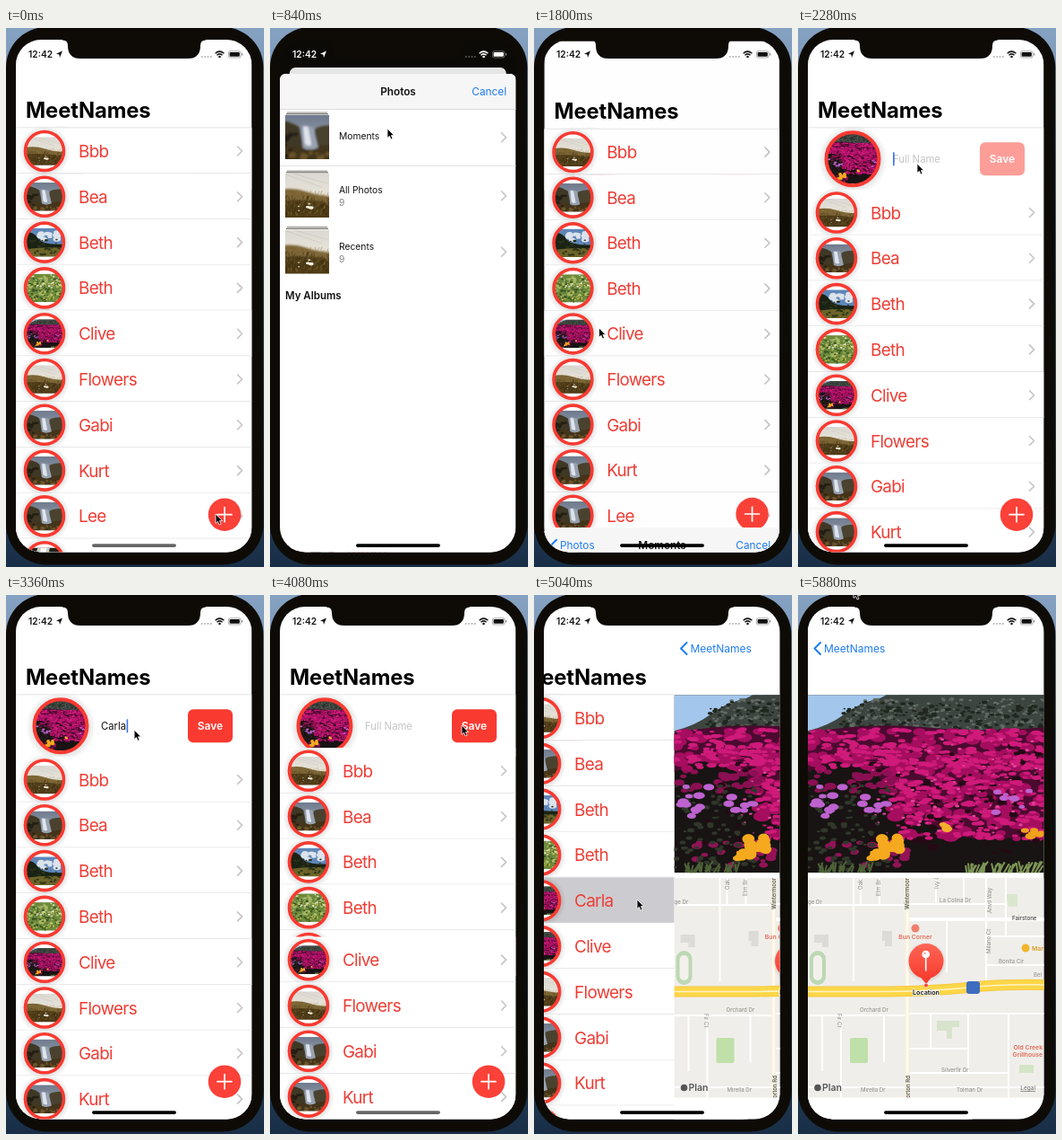
Animation, 288 px wide and 600 px high, one loop 6000 ms. Source, as an HTML page:

```html
<!DOCTYPE html>
<html lang="en">
<head>
<meta charset="utf-8">
<title>Contact list demo</title>
<style>
html, body { margin: 0; width: 100%; height: 100%; overflow: hidden; background: #0e0b06; }
svg { font-family: Inter, Roboto, sans-serif; }
#stage { display: block; width: 288px; height: 600px; }
</style>
</head>
<body>
<svg id="stage" viewBox="0 0 288 600"></svg>
<script>
const LOOP = 6000, STEP = 120, ROW = 50.8, FORM = 68.5, TOP = 111.3;
const RED = '#f93a31', BLUE = '#1f7df0', GREY = '#c5c5c9';
const stage = document.getElementById('stage');
const $ = id => document.getElementById(id);

let seed = 77;
const rnd = () => (seed = seed * 16807 % 2147483647) / 2147483647;

// --- drawing helpers
const rect = (x, y, w, h, fill, more = '') =>
  `<rect x="${x}" y="${y}" width="${w}" height="${h}" fill="${fill}" ${more}/>`;
const circle = (x, y, r, fill, more = '') =>
  `<circle cx="${x}" cy="${y}" r="${r}" fill="${fill}" ${more}/>`;
const shape = (d, fill, more = '') => `<path d="${d}" fill="${fill}" ${more}/>`;
const line = (d, color, w, more = '') =>
  `<path d="${d}" fill="none" stroke="${color}" stroke-width="${w}" ${more}/>`;
const text = (x, y, size, str, fill = '#111', more = '') =>
  `<text x="${x}" y="${y}" font-size="${size}" fill="${fill}" ${more}>${str}</text>`;
const group = (id, body, more = '') => `<g id="${id}" ${more}>${body}</g>`;
const soft = body => `<g filter="url(#blur)">${body}</g>`;
const MID = 'text-anchor="middle"', SEMI = 'font-weight="600"', BOLD = 'font-weight="700"';
const ROUND = 'stroke-linecap="round" stroke-linejoin="round"';

const chevron = y => line(`M258.5 ${y - 5}l5 5l-5 5`, '#c4c4c8', 1.6, ROUND);
const back = y => line(`M25 ${y - 6.5}l-6.5 6.5l6.5 6.5`, BLUE, 2, ROUND);
const photo = (kind, x, y, w, h, fit = 'slice') =>
  `<svg x="${x}" y="${y}" width="${w}" height="${h}" viewBox="0 0 264 198" preserveAspectRatio="xMidYMid ${fit}"><use href="#${kind}"/></svg>`;

function dots(n, fill, x, y, w, h, r0, r1, flat = 0.6) {
  let d = '';
  for (let i = 0; i < n; i++) {
    const r = +(r0 + rnd() * (r1 - r0)).toFixed(1), k = r * flat;
    d += `M${(x + rnd() * w - r).toFixed(1)} ${(y + rnd() * h).toFixed(1)}` +
      `a${r} ${k} 0 1 0 ${2 * r} 0a${r} ${k} 0 1 0 ${-2 * r} 0`;
  }
  return shape(d, fill);
}

function blades(n, color, x, y, w, h, len) {
  let d = '';
  for (let i = 0; i < n; i++)
    d += `M${(x + rnd() * w).toFixed(1)} ${(y + rnd() * h).toFixed(1)}l${(rnd() * 14 - 4).toFixed(1)} ${-len}`;
  return line(d, color, 2);
}

// --- pictures, all 264 x 198
const pictures = {
  dune: () => rect(0, 0, 264, 198, 'url(#haze)') +
    line('M20 0L200 62M70 0L240 50', '#b9b4a6', 1.5) +
    soft(shape('M-20 78Q60 58 130 82T290 104V220H-20Z', '#7b6434') +
      shape('M-20 124Q120 108 290 138V220H-20Z', '#4f3c18')) +
    blades(100, '#8d7542', 0, 92, 264, 100, 15) + blades(130, '#3a2b10', 0, 112, 264, 86, 15) +
    dots(4, '#cfc2a0', 90, 130, 120, 40, 4, 7) + dots(2, '#f6f0e0', 135, 148, 22, 8, 9, 12),
  fall: () => rect(0, 0, 264, 198, 'url(#dusk)') +
    soft(shape('M-20 22Q50 22 96 54L118 160L-20 175Z', '#3f3825') +
      shape('M290 48Q200 40 168 62L150 160L290 175Z', '#4a422f') +
      shape('M-20 130Q120 158 290 122V220H-20Z', '#43341a') +
      shape('M108 48Q132 42 160 56L182 146Q140 164 112 146Z', '#98a2b0') +
      shape('M114 54Q124 48 136 54L152 134Q134 142 122 130Z', '#dfe4ec') +
      dots(16, '#241e12', 0, 80, 80, 110, 8, 18) + dots(12, '#6c552a', 60, 165, 190, 30, 8, 18)),
  stream: () => rect(0, 0, 264, 198, '#25221a') +
    soft(dots(24, '#403a29', 0, 0, 264, 198, 8, 18) +
      shape('M85 0H170Q150 55 205 100T240 200H190Q180 130 135 95Q95 105 75 200H40Q50 90 85 0Z', '#c9c9c6') +
      shape('M105 0H150Q130 50 165 85L140 80Q110 60 100 90Z', '#fafafa')),
  coast: () => rect(0, 0, 264, 198, '#5f86b8') +
    soft(dots(14, '#dbe3ec', 90, 30, 174, 50, 16, 30) +
      shape('M-20 25Q55 20 85 70T290 112V220H-20Z', '#1a2213') +
      shape('M-20 150Q130 128 290 138V220H-20Z', '#6c6428') + dots(40, '#2b331a', 0, 80, 240, 110, 5, 13)),
  garden: () => rect(0, 0, 264, 198, '#6d8a3c') + dots(70, '#a6b765', 0, 10, 264, 180, 7, 15) +
    dots(90, '#3b5822', 0, 30, 264, 168, 4, 12) + dots(35, '#d9c649', 0, 60, 264, 120, 4, 8) +
    dots(30, '#e9e9d4', 0, 0, 264, 100, 4, 9),
  bloom: () => rect(0, 0, 264, 198, '#181413') + rect(0, 0, 100, 44, '#a3c6ec') +
    shape('M0 40Q24 34 40 22T72 6Q84 4 92 -4H264V60H0Z', '#3d4540') +
    dots(260, '#616c64', 44, 4, 220, 36, 1, 2.6) + dots(200, '#20271f', 36, 8, 228, 34, 1, 3.5) +
    shape('M0 42Q70 30 130 36T264 36V150Q200 172 150 150T80 92T0 86Z', '#4b0a2f') +
    dots(110, '#a50d5f', 0, 40, 264, 44, 4, 9) + dots(150, '#a50d5f', 90, 68, 174, 92, 4, 10) +
    dots(26, '#8b0f52', 0, 84, 100, 24, 3, 7) + dots(24, '#931257', 20, 160, 90, 30, 3, 6) +
    dots(120, '#250915', 30, 56, 234, 120, 2, 5) +
    dots(210, '#cf1a7a', 0, 38, 264, 44, 2, 6, 0.45) + dots(260, '#cf1a7a', 92, 68, 172, 92, 2, 6, 0.45) +
    dots(70, '#e2449a', 60, 44, 204, 110, 1, 2.5) + dots(110, '#30372b', 0, 100, 92, 96, 1.5, 4) +
    dots(20, '#bd62cf', 6, 98, 92, 38, 4, 6.5) + dots(8, '#bd62cf', 205, 106, 45, 26, 3, 6) +
    dots(14, '#f4a91e', 82, 158, 20, 24, 5, 8, 0.8) + dots(5, '#f4a91e', 66, 174, 14, 8, 4, 6) +
    dots(4, '#f4b02c', 150, 144, 9, 6, 4, 6) + dots(7, '#f0a11c', 242, 150, 20, 10, 4, 6) +
    blades(40, '#7d9556', 175, 198, 80, 6, 13) + blades(26, '#4d6137', 0, 196, 70, 6, 11)
};

const stops = (id, a, b) => `<linearGradient id="${id}" x2="0" y2="1"><stop stop-color="${a}"/><stop offset="1" stop-color="${b}"/></linearGradient>`;
const defs = '<defs>' + stops('haze', '#dbd9d3', '#f3ecdc') + stops('dusk', '#6f7b8e', '#a5acb6') +
  stops('desk', '#86a2c2', '#182e47') + stops('pinRed', '#ff6656', '#f73d30') +
  `<filter id="blur"><feGaussianBlur stdDeviation="4"/></filter>
  <radialGradient id="shade"><stop offset=".74" stop-opacity=".13"/><stop offset="1" stop-opacity="0"/></radialGradient>
  <clipPath id="screen">${rect(11, 13, 263.4, 570.5, '#000', 'rx="28"')}</clipPath>
  <clipPath id="disc">${circle(43, 25.7, 21, '#000')}</clipPath>
  <clipPath id="bigDisc">${circle(61, 34.5, 29, '#000')}</clipPath>
  <clipPath id="mapBox">${rect(11, 315, 264, 244.5, '#000')}</clipPath>` +
  Object.entries(pictures).map(([id, draw]) => group(id, draw())).join('') + '</defs>';

// --- contact list
const people = [
  ['Bbb', 'dune'], ['Bea', 'fall'], ['Beth', 'coast'], ['Beth', 'garden'], ['Carla', 'bloom'],
  ['Clive', 'bloom'], ['Flowers', 'dune'], ['Gabi', 'fall'], ['Kurt', 'fall'], ['Lee', 'fall'], ['Mmm', 'stream']
];
const ADDED = 4, TYPED = people[ADDED][0];

const row = ([name, kind], i) => group('row' + i,
  rect(11, 0, 263.5, ROW, '#fff', `id="bg${i}"`) +
  circle(43, 26.2, 29, 'url(#shade)') + circle(43, 25.7, 22, '#fff') +
  `<g clip-path="url(#disc)">${photo(kind, 22, 9.9, 42, 31.6, 'meet')}</g>` +
  circle(43, 25.7, 21.5, 'none', `stroke="${RED}" stroke-width="3.6"`) +
  text(81, 32.8, 18.9, name, '#ee3d35', 'letter-spacing="-.72"') + chevron(25.7) +
  rect(11, ROW - 0.8, 263.5, 0.8, '#dedee1'));

const form = `<g transform="translate(0 ${TOP})">` + rect(11, 0, 263.5, FORM, '#fff') +
  circle(61, 35.5, 39, 'url(#shade)') + circle(61, 34.5, 30, '#fff') +
  `<g clip-path="url(#bigDisc)">${photo('bloom', 31, 6, 60, 56)}</g>` +
  circle(61, 34.5, 29.5, 'none', `stroke="${RED}" stroke-width="4"`) +
  text(106, 38.5, 11.3, '', GREY, 'id="field"') +
  rect(106, 27, 1.6, 15, '#3b74e6', 'id="caret"') +
  rect(203, 16, 50, 37, RED, 'rx="6" id="save"') +
  text(228, 38.7, 12, 'Save', '#fff', `${MID} ${SEMI}`) + '</g>';

const list = group('list', rect(11, 13, 263.5, 571, '#fff', 'rx="7" id="page"') + form +
  people.map(row).join('') + rect(11, TOP - 0.8, 263.5, 0.8, '#dedee1') +
  text(22, 100, 23.8, 'MeetNames', '#000', `${BOLD} letter-spacing="-.1"`) +
  circle(244, 541.7, 18.3, '#fb4138') +
  line('M236 541.7h16M244 533.7v16', '#fff', 1.7, 'stroke-linecap="round"'));

// --- photo picker sheet
const album = (y, kind, name, count) =>
  rect(19, y - 3.4, 45, 1, '#8d8a83') + rect(18, y - 1.7, 47, 1, '#55514a') + photo(kind, 17, y, 49, 49) +
  text(77, count ? y + 22 : y + 27, 10.3, name) +
  (count ? text(77, y + 36, 10.3, count, '#8a8a8e') : '') + chevron(y + 24.7);

const sections = [
  ['August 9, 2012', 'stream'], ['August 9, 2012', 'fall'], ['March 30, 2018', 'bloom'],
  ['November 27', 'bloom'], ['November 29', 'fall', 'dune']
];
const moments = sections.map(([date, ...kinds], i) => {
  const y = 94.3 + i * 99.4;
  return kinds.map((k, j) => photo(k, 11 + j * 66.5, y, 65, 64.5)).join('') +
    (i ? text(22.5, y - 10, 11.5, date, '#111', SEMI) : '');
}).join('') + rect(11, 90, 264, 29, '#f3f3f4') + text(22.5, 109, 11.5, sections[0][0], '#111', SEMI);

const sheet = group('sheet', rect(11, 51, 263.5, 560, '#fff', 'rx="7"') +
  group('albums', album(97, 'fall', 'Moments') + rect(11, 153, 264, 0.8, '#dedee1') +
    album(162, 'dune', 'All Photos', 9) + album(224.5, 'dune', 'Recents', 9) +
    text(17, 302, 11.5, 'My Albums', '#111', SEMI)) +
  group('moments', rect(11, 90, 264, 500, '#fff') + moments) +
  shape('M11 91V58q0-7 7-7H267.5q7 0 7 7V91Z', '#f6f6f7') + rect(11, 90, 264, 0.8, '#d8d8db') +
  group('navA', text(143, 75, 11.8, 'Photos', '#111', `${MID} ${SEMI}`)) +
  group('navB', back(71) + text(29, 75, 11.8, 'Photos', BLUE) + text(143, 75, 11.8, 'Moments', '#111', `${MID} ${SEMI}`)) +
  text(264, 75, 11.8, 'Cancel', BLUE, 'text-anchor="end"'));

// --- detail page
const street = (x, y, str, turn = 0, more = '') =>
  text(0, 0, 6.1, str, '#8c8a87', `transform="translate(${x} ${y}) rotate(${turn})" ${more}`);
const strong = 'style="fill:#55534f" font-weight="600"';
const highway = 'M11 441.5H100Q150 441 190 437T275 434';
const town = `<g clip-path="url(#mapBox)">` + rect(11, 315, 264, 245, '#f0eeea') +
  rect(13, 396, 18, 38, '#bcd8b4', 'rx="9"') + rect(17, 401, 10, 28, '#f2f1ec', 'rx="5"') +
  rect(58, 493, 20, 28, '#bfe0a8', 'rx="2"') + shape('M155 474h25v7h-8v13h-6v-9h-11z', '#d7e3cb') +
  shape('M231 333h14v14h-10z', '#d9e8cd') + rect(247, 523, 16, 9, '#d3e5c6') +
  shape('M18 378h16v14h-7v-5h-9zM94 374h11v17h-8v-6h-3z', '#dddbd8') +
  line('M11 345H122M70 315V345M91 315V345M122 344H232M154 315V344M185 315V344M210 315V430M232 315V380' +
    'M210 380H275M210 412H275M166 362V420M11 468H122M48 468V560M96 468V520M11 548H275M27 468V530M122 466H275' +
    'M148 466V505M122 532H235M190 466V532M235 466V560M122 505H190M62 315V430', '#fff', 2) +
  line('M122 361H275', '#fff', 4) + line('M122 315V560', '#f8efd2', 5) + line('M122 315V560', '#fffaf0', 3) +
  line(highway, '#f3c63f', 12) + line(highway, '#fdd648', 10.6) + line(highway, '#fff3c4', 1.6) +
  street(72, 328, 'Oak Ct', -90) + street(92, 335, 'Elm Br', -90) + street(157, 327, 'Ivy Ct', -90) +
  street(124, 350, 'Wintermoor', -90, strong) + street(158, 342, 'La Colina Dr') +
  street(216, 354, 'Anvil Way', -90) + street(239, 362, 'Fairstone', 0, strong) +
  street(215, 399, 'Milano Ct', -90) + street(224, 410, 'Bonita Cir') + street(263, 425, 'Bel') +
  street(69, 464, 'Orchard Dr') + street(44, 466, 'Fir Ct', 90) + street(160, 531, 'Silverfir Dr') +
  street(70, 553, 'Mirella Dr') + street(177, 553, 'Tolman Dr') + street(125, 560, 'orton Rd', -90, strong) +
  street(11, 344, 'ge Dr') + circle(131, 371, 4.5, '#f07f6d') + circle(254, 393, 4.5, '#f1b52c') +
  text(131, 383, 6.8, 'Bun Corner', '#e06b58', `${MID} ${SEMI}`) + text(261, 395.5, 6.8, 'Mart', '#d99a1e', SEMI) +
  text(273, 506, 6.8, 'Old Creek', '#e06b58', `text-anchor="end" ${SEMI}`) +
  text(273, 514, 6.8, 'Grillhouse', '#e06b58', `text-anchor="end" ${SEMI}`) +
  rect(188, 430, 15, 14, '#3e6cc0', 'rx="3"') +
  circle(143, 409, 23, 'url(#shade)') + shape('M135 423L143 433L151 423Z', '#f73d30') +
  circle(143, 407.5, 19.5, 'url(#pinRed)') + circle(142.7, 400, 4.3, '#fff') + circle(141.5, 399, 1.2, '#f99') +
  line('M142.7 403V418', '#fff', 1.6, 'stroke-linecap="round"') + circle(143, 434.5, 2.3, '#f84337', 'stroke="#fff" stroke-width=".5"') +
  text(143, 445, 7.2, 'Location', '#111', `${MID} ${SEMI} stroke="#fff" stroke-width="1.6" paint-order="stroke"`) +
  circle(22, 548.5, 3.8, '#555') + text(27, 552, 10.5, 'Plan', '#555', SEMI) +
  text(265, 551, 6.5, 'Legal', '#666', 'text-anchor="end" text-decoration="underline"') + '</g>';

const detail = group('detail', rect(11, 13, 264, 571, '#fff') + back(59.5) +
  text(29, 64, 12, 'MeetNames', BLUE) + photo('bloom', 11, 111.3, 264, 198) + town);

// --- phone
const status = group('status', text(25, 33, 10.2, '12:42', 'currentColor', SEMI) +
  shape('M63 25.5L56 28.7L59.4 29.4L60 33Z', 'currentColor') +
  [218, 221.4, 224.8, 228.2].map(x => circle(x + 0.7, 32, 0.9, 'currentColor', 'opacity=".35"')).join('') +
  line('M233.6 28.2q4.9-4.2 9.8 0M235.4 30.2q3.1-2.6 6.2 0', 'currentColor', 1.5) +
  circle(238.5, 32, 1.3, 'currentColor') +
  rect(248.4, 25.8, 13.6, 7.2, 'none', 'rx="2" stroke="currentColor" stroke-width=".7" opacity=".5"') +
  rect(249.6, 27, 11.2, 4.8, 'currentColor', 'rx="1"') + rect(263, 28, 1, 2.6, 'currentColor', 'opacity=".5"'));

const notch = shape('M63 12H223V13.4q-6 0-6 6q0 14.6-14 14.6H83q-14 0-14-14.6q0-6-6-6Z', '#0e0b06');
const pointer = group('pointer',
  shape('M0 0V10.4L2.4 8.3L4.1 12L6 11.2L4.4 7.6H7.6Z', '#000', 'stroke="#fff" stroke-width=".8"'));

stage.innerHTML = defs + rect(0, 0, 288, 600, 'url(#desk)') +
  rect(0, -1, 287.3, 598.5, '#0e0b06', 'rx="45"') +
  `<g clip-path="url(#screen)">${rect(11, 13, 264, 571, '#0c0a06')}${list}
  ${sheet}${detail}</g>` + notch + status +
  rect(96, 574.3, 94, 3.6, '#000', 'rx="1.8" id="home"') + pointer;

// --- motion
const clamp = u => Math.max(0, Math.min(1, u));
const ease = u => u < 0.5 ? 2 * u * u : 1 - 2 * (1 - u) * (1 - u);
const ramp = (t, a, b) => ease(clamp((t - a) / (b - a)));
const move = (id, x, y, scale = 1) => $(id).setAttribute('transform', `translate(${x} ${y}) scale(${scale})`);
const show = (id, on) => $(id).setAttribute('opacity', +on);

const path = [
  [0, 234, 541], [240, 234, 541], [720, 131, 112], [840, 131, 112], [1080, 122, 138], [1440, 44, 420],
  [1560, 44, 420], [2160, 133, 151], [3240, 133, 151], [3720, 214, 145], [4080, 214, 145],
  [4680, 115, 339], [5160, 115, 339], [5880, 62, -7], [LOOP, 62, -7]
];
function pointerAt(t) {
  const i = path.findIndex(p => p[0] > t), [a, x, y] = path[i - 1], [b, x2, y2] = path[i];
  const u = ramp(t, a, b);
  return [x + (x2 - x) * u, y + (y2 - y) * u];
}

function draw(t) {
  const up = ramp(t, 180, 480) - ramp(t, 1500, 1860);
  const deep = ramp(t, 860, 1070);
  const saved = ramp(t, 4000, 4300);
  const open = ramp(t, 1800, 2040) * (1 - saved);
  const push = ramp(t, 4860, 5240);

  people.forEach((_, i) => {
    const extra = i > ADDED ? saved - 1 : 0;
    move('row' + i, 0, TOP + FORM * open + ROW * (i + extra));
  });
  $('bg' + ADDED).setAttribute('fill', t >= 4740 ? '#ccccd0' : '#fff');

  const typed = t < 3960 ? TYPED.slice(0, Math.max(0, Math.floor((t - 2400) / 180))) : '';
  const field = $('field');
  field.textContent = typed || 'Full Name';
  field.setAttribute('fill', typed ? '#111' : GREY);
  $('caret').setAttribute('x', 106 + (typed ? field.getComputedTextLength() + 0.5 : 0));
  show('caret', t >= 2160 && t < 3960 && (t - 2160) % 960 < 480);
  $('save').setAttribute('fill', typed || t >= 3960 ? RED : '#fd9d98');

  const scale = 1 - 0.082 * up;
  move('list', 142.75 * (1 - scale) - 80 * push, 13 * (1 - scale) + 31 * up, scale);
  $('list').style.filter = up > 0 ? `brightness(${1 - 0.1 * up})` : '';
  move('sheet', 0, 535 * (1 - up));
  show('sheet', up > 0);
  move('albums', -80 * deep, 0);
  move('moments', 264 * (1 - deep), 0);
  show('navA', 1 - deep);
  show('navB', deep);
  move('detail', 264 * (1 - push), 0);
  show('detail', push > 0);

  $('status').style.color = up > 0.5 ? '#fff' : '#111';
  $('home').setAttribute('fill', t < 240 || (t >= 3960 && t < 4440) ? '#666' : '#000');
  move('pointer', ...pointerAt(t));
}

let shown = -1;
function tick() {
  const t = Math.floor(performance.now() % LOOP / STEP) * STEP;
  if (t !== shown) draw(shown = t);
  requestAnimationFrame(tick);
}
tick();
</script>
</body>
</html>
```
